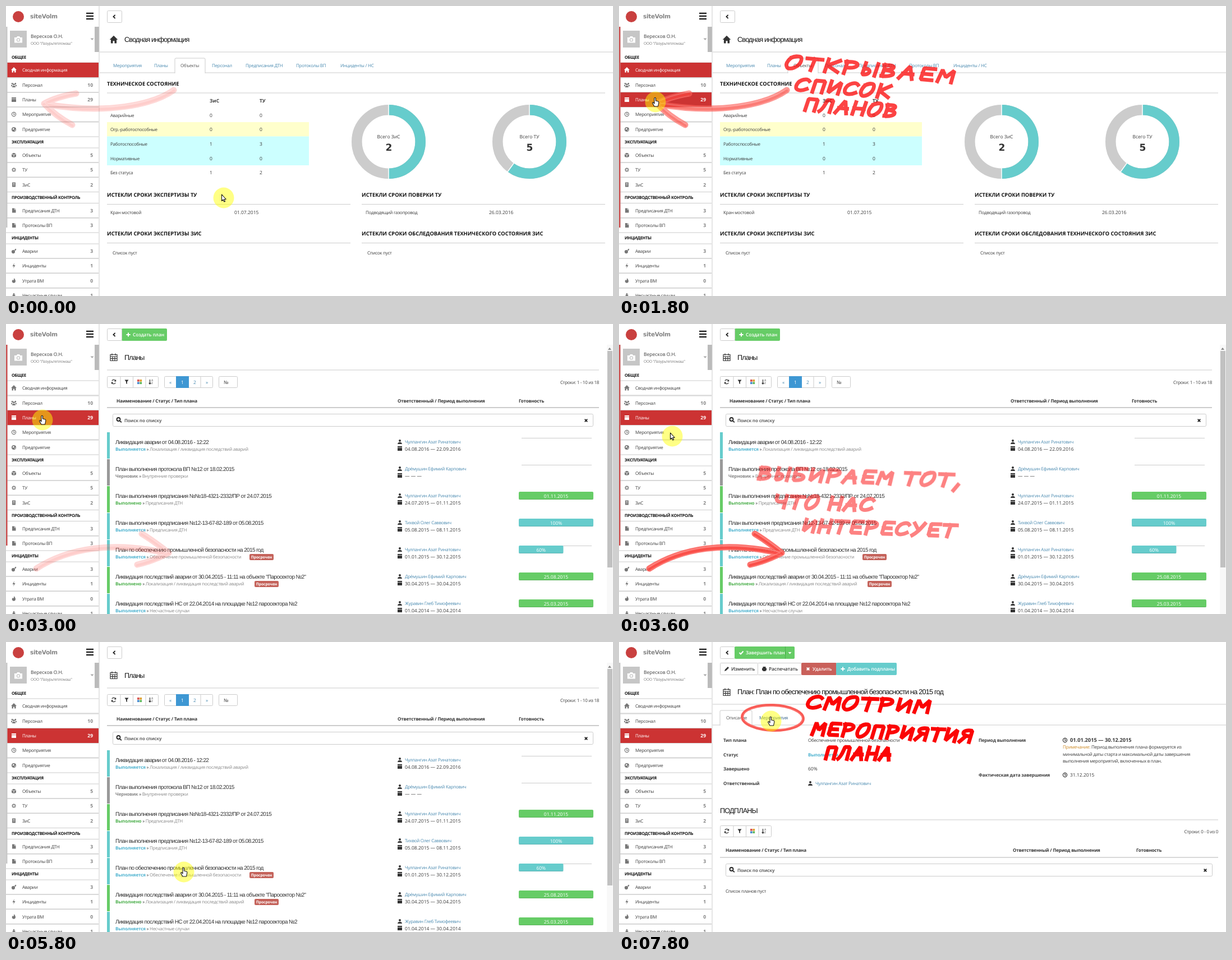
Recreate the animation shown at these times as an HTML page. Size 1082 by 517 pixels, loop 8 s.

```html
<!DOCTYPE html>
<html lang="ru">
<head>
<meta charset="utf-8">
<title>Планы</title>
<style>
html, body { margin: 0; width: 100%; height: 100%; overflow: hidden; background: #fff; }
svg { display: block; width: 100vw; height: 100vh; }
text { font: 8px "Open Sans", "Noto Sans", sans-serif; letter-spacing: -.035em; fill: #3c3c3c; text-rendering: geometricPrecision; white-space: pre; }
.b { font-weight: 700; letter-spacing: -.02em; }
.m { text-anchor: middle; }
.e { text-anchor: end; }
.h { font-size: 9.3px; font-weight: 700; letter-spacing: 0; fill: #111; }
.s { font-size: 7.4px; font-weight: 700; fill: #111; }
.d { font-size: 8.5px; letter-spacing: 0; }
.w { font-size: 8.4px; font-weight: 600; letter-spacing: -.01em; }
.t { font: 12.6px "Liberation Sans", Arial, sans-serif; letter-spacing: -.06em; fill: #111; }
.r { font: 10px "Liberation Sans", Arial, sans-serif; letter-spacing: -.063em; fill: #333; }
.ink { fill: none; stroke-linecap: round; stroke-linejoin: round; }
.pen { fill: none; stroke: #fb0505; stroke-width: 6.8; stroke-linecap: square; stroke-linejoin: bevel; }
</style>
</head>
<body>
<svg id="stage" viewBox="0 0 1082 517" preserveAspectRatio="none"></svg>
<script>
const RED = '#cc3333', TEAL = '#66cccc', GREEN = '#66cc66', LINK = '#4a8ab0', GREY = '#cccccc', DARK = '#333';

const text = (x, y, s, cls = '', fill = '') =>
  `<text x="${x}" y="${y}" class="${cls}"${fill && ` style="fill:${fill}"`}>${s}</text>`;
const span = (s, fill, cls = '') => `<tspan class="${cls}" style="fill:${fill}">${s}</tspan>`;
const rect = (x, y, w, h, fill, stroke = 'none', rx = 0) =>
  `<rect x="${x}" y="${y}" width="${w}" height="${h}" fill="${fill}" stroke="${stroke}" rx="${rx}"/>`;
const line = (x1, y, x2, w = 1, c = GREY) => rect(x1, y - w / 2, x2 - x1, w, c);
const vline = (x, y1, y2) => rect(x - .5, y1, 1, y2 - y1, GREY);
const group = (id, s) => `<g id="${id}">${s}</g>`;

const solid = {
  home: 'M-5 0L0-5 5 0H3.5V4.5H1V1.5H-1V4.5H-3.5V0Z',
  user: 'M0-4a2 2 0 110 4a2 2 0 110-4M-4 4C-4-.5 4-.5 4 4Z',
  users: 'M0-3a1.8 1.8 0 110 3.6a1.8 1.8 0 110-3.6M-3 4C-3 0 3 0 3 4ZM-4-4h2v3h-2zM2-4h2v3h-2zM-5 0h2.4v2h-2.4zM2.6 0h2.4v2h-2.4z',
  cal: 'M-4-4H4V-2H-4ZM-4-1.2H4V4H-4Z',
  globe: 'M0-4A4 4 0 110 4 4 4 0 110-4M-2-2L1-2.5 0 0-2 1ZM1 1L3 0 2 3Z',
  cube: 'M0-4.3L3.8-2.5 0-.8-3.8-2.5ZM-4-1.7L-.4 0V4.3L-4 2.5ZM4-1.7L.4 0V4.3L4 2.5Z',
  house: 'M-3-4H3V4H-3ZM-1.5-2.5V-1.5H1.5V-2.5ZM-1.5 0V1H1.5V0Z',
  file: 'M-3-4H.8V-1.2H3.5V4H-3ZM1.5-4L3.5-2H1.5Z',
  bomb: 'M-1-2a3.1 3.1 0 110 6.2a3.1 3.1 0 110-6.2M1-2L3-4.5 4.5-3 2.5-.5Z',
  bolt: 'M1-5L-2.5 1H0L-1 5 2.5-1H0Z',
  fire: 'M0-4.5C4-1 4 4 0 4.2-4.5 4-3.5-1-2-1.5L-1 0Q1-2 0-4.5Z',
  man: 'M0-4a1.5 1.5 0 110 3a1.5 1.5 0 110-3M-3-1H3L1.5 1V5H-1.5V1Z',
  filter: 'M-3.5-3.5H3.5L.9 0V4L-.9 3V0Z',
  camera: 'M-7-4H-3L-2-6H2L3-4H7V5.5H-7ZM0-2.8a3.2 3.2 0 100 6.4a3.2 3.2 0 100-6.4M0-1.4a1.9 1.9 0 110 3.8a1.9 1.9 0 110-3.8',
  down: 'M-3-1.5H3L0 2Z',
  pen: 'M-4 4L-3 1 2-4 4-2-1 3Z',
  printer: 'M-2.5-4H2.5V-1.5H4V2.5H2.5V4H-2.5V2.5H-4V-1.5H-2.5Z'
};
const stroked = {
  clock: 'M0-3.6A3.6 3.6 0 110 3.6 3.6 3.6 0 110-3.6M0-2.2V.3H1.8',
  gear: 'M0-2.2A2.2 2.2 0 110 2.2 2.2 2.2 0 110-2.2M0-4V-2.5M0 4V2.5M-4 0H-2.5M4 0H2.5M-2.8-2.8L-1.8-1.8M2.8 2.8L1.8 1.8M-2.8 2.8L-1.8 1.8M2.8-2.8L1.8-1.8',
  grid: 'M-6-4.5H6V6.5H-6ZM-6-1H6M-2-1V6.5M2-1V6.5M-6 2.7H6M-3-6.5V-3M3-6.5V-3',
  back: 'M1.6-3.2L-1.6 0 1.6 3.2',
  plus: 'M0-3.6V3.6M-3.6 0H3.6',
  cross: 'M-2.3-2.3L2.3 2.3M2.3-2.3L-2.3 2.3',
  tick: 'M-3.5 0L-1 2.5 3.5-2.5',
  lens: 'M-1-4A3 3 0 11-1 2 3 3 0 11-1-4M1.3 1.3L4.3 4.3',
  reload: 'M3.4-1.2A3.6 3.6 0 00-3.2-1.8M3.6-3.6V-1H1M-3.4 1.2A3.6 3.6 0 003.2 1.8M-3.6 3.6V1H-1',
  sort: 'M-2.5-4V4M-4.3 2L-2.5 4-.7 2'
};
const icon = (name, x, y, c = DARK, w = 1.2) => `<path transform="translate(${x} ${y})" ` + (solid[name]
  ? `d="${solid[name]}" fill="${c}" fill-rule="evenodd"/>`
  : `d="${stroked[name]}" fill="none" stroke="${c}" stroke-width="${w}"/>`);

// ---- sidebar ----
const menu = [
  ['Сводная информация', 'home', '', 114], ['Персонал', 'users', 10, 141], ['Планы', 'cal', 29, 167],
  ['Мероприятия', 'clock', '', 193], ['Предприятие', 'globe', '', 220],
  ['Объекты', 'cube', 5, 266], ['ТУ', 'gear', 5, 292], ['ЗиС', 'house', 2, 318.5],
  ['Предписания ДТН', 'file', 3, 364.5], ['Протоколы ВП', 'file', 3, 391],
  ['Аварии', 'bomb', 3, 437], ['Инциденты', 'bolt', 1, 463], ['Утрата ВМ', 'fire', 0, 489.5], ['Несчастные случаи', 'man', 1, 516]
];
const item = ([label, ic, n, y], c, ci, cn) => icon(ic, 14, y, ci) + text(29, y + 3, label, '', c) +
  text(155, y + 3, n, 'd b e', cn);
const lit = (id, i) => group(id, rect(0, menu[i][3] - 13, 165, 26, RED) + item(menu[i], '#fff', '#fff', '#fff'));

const sidebar = () => rect(0, 0, 166, 517, '#fff') +
  '<circle cx="22" cy="19" r="10" fill="#c9403f"/>' +
  '<text x="43" y="22" style="font:700 10.6px \'DejaVu Sans\',sans-serif;fill:#858585">siteVolm</text>' +
  [13, 18, 23].map(y => line(143, y, 156, 2.4, '#222')).join('') +
  rect(7, 44, 30, 30, '#c6c6c6') + icon('camera', 22, 60, '#fff') +
  text(44, 57, 'Вересков О.Н.', 'd') +
  '<text x="44" y="68.5" style="font-size:6.7px;fill:#777">ООО "Лазурьтепломаш"</text>' +
  icon('down', 153.5, 59, '#aaa') + rect(158, 37, 8, 45, '#bbb') +
  [['ОБЩЕЕ', 94], ['ЭКСПЛУАТАЦИЯ', 245], ['ПРОИЗВОДСТВЕННЫЙ КОНТРОЛЬ', 344], ['ИНЦИДЕНТЫ', 416]]
    .map(([s, y]) => text(10, y, s, 's')).join('') +
  menu.map(m => line(0, m[3] - 13, 165) + line(0, m[3] + 13, 165) + item(m, '#3c3c3c', '#777', '#808080')).join('') +
  lit('homeRow', 0) + lit('planRow', 2) + lit('eventRow', 3) + lit('firmRow', 4) +
  rect(0, 37, 2.5, 358, '#c8c8c8') + group('strip', rect(0, 37, 2.5, 358, '#cc5555')) + vline(166, 0, 517);

// ---- shared widgets ----
const backBtn = rect(180.5, 8.5, 26, 21, '#fff', GREY, 2) + icon('back', 193, 19, '#222', 1.8);
const button = (x, y, w, fill, ic, s, c = '#fff') => rect(x + .5, y + .5, w, 21, fill, c === '#fff' ? fill : GREY, 1) +
  icon(ic, x + 12, y + 11, c, 2) + text(x + 20, y + 14, s, 'w', c);
const search = (y, w) => rect(190.5, y + .5, w, 22, '#fff', GREY, 2) + icon('lens', 201.5, y + 11, '#222', 1.8) +
  text(211, y + 14.5, 'Поиск по списку', 'b', '#666') + icon('cross', 178 + w, y + 12, '#222', 1.8);
const tools = y => rect(180.5, y + .5, 91, 20, '#fff', GREY, 2) + [204, 226.5, 249].map(x => vline(x, y, y + 21)).join('') +
  icon('reload', 192, y + 10) + icon('filter', 215, y + 10) + icon('sort', 259, y + 10) +
  ['#d9534f', '#e0a030', '#4a8ad0', '#5cb85c'].map((c, i) => rect(234 + i % 2 * 4.4, y + 6 + (i >> 1) * 4.4, 3.7, 3.7, c)).join('') +
  `<text x="259" y="${y + 9}" style="font-size:5px">A</text><text x="259" y="${y + 14}" style="font-size:5px">Z</text>`;
const heads = (y, ...xs) => ['Наименование / Статус / Тип плана', 'Ответственный / Период выполнения', 'Готовность']
  .map((s, i) => text(xs[i], y, s, 'b', DARK)).join('');
const tab = (x, y, w) => line(167, y + 26, 1082) +
  `<path d="M${x} ${y + 27}V${y + 2}q0-2 2-2H${x + w - 2}q2 0 2 2V${y + 27}" fill="#fff" stroke="${GREY}"/>`;

// ---- dashboard ----
function donut(cx, share, label, n) {
  const a = share * 2 * Math.PI, cut = (p, r) => `${cx + r * Math.sin(p)} ${242 - r * Math.cos(p)}`;
  const r = 56.7, len = 2 * Math.PI * r;
  const ring = (c, d) => `<circle cx="${cx}" cy="242" r="${r}" fill="none" stroke="${c}" stroke-width="18.6" stroke-dasharray="${d * len} ${len}" transform="rotate(-90 ${cx} 242)"/>`;
  return ring(GREY, 1) + ring(TEAL, share) +
    `<path d="M${cut(0, 46)}L${cut(0, 67)}M${cut(a, 46)}L${cut(a, 67)}" stroke="#fff" stroke-width="1.5"/>` +
    text(cx, 235.5, label, 'm d') + `<text x="${cx}" y="258" class="m" style="font:700 17px 'DejaVu Sans',sans-serif;fill:#333">${n}</text>`;
}
function dashboard() {
  const tabs = [['Мероприятия', 191], ['Планы', 264], ['Объекты', 311], ['Персонал', 367], ['Предписания ДТН', 427], ['Протоколы ВП', 517], ['Инциденты / НС', 596]];
  const rows = [['Аварийные', 0, 0], ['Огр.-работоспособные', 0, 0], ['Работоспособные', 1, 3], ['Нормативные', 0, 0], ['Без статуса', 1, 2]];
  const block = (x, y, head) => text(x, y, head, 'h') + line(x, y + 13.5, x + 434);
  return backBtn + `<g transform="translate(192 60) scale(1.45)">${icon('home', 0, 0)}</g>` +
    text(211, 64, 'Сводная информация', 't') + line(167, 82, 1082) + tab(301, 93, 54) +
    tabs.map(([s, x]) => text(x, 109, s, '', x === 311 ? '#555' : LINK)).join('') +
    text(180, 142, 'ТЕХНИЧЕСКОЕ СОСТОЯНИЕ', 'h') + line(180, 155, 1068) +
    text(363, 171.5, 'ЗиС', 'd b') + text(452, 171.5, 'ТУ', 'd b') +
    rect(180, 207, 360, 25.5, '#ffffcc') + rect(180, 232.5, 360, 51.5, '#ccffff') +
    rows.map(([s, a, b], i) => [[186, s, ''], [363, a, 'd'], [452, b, 'd']]
      .map(([x, v, c]) => text(x, 197.5 + i * 25.7, v, c)).join('')).join('') +
    donut(682, .5, 'Всего ЗиС', 2) + donut(933, .6, 'Всего ТУ', 5) +
    block(180, 340, 'ИСТЕКЛИ СРОКИ ЭКСПЕРТИЗЫ ТУ') + block(634, 340, 'ИСТЕКЛИ СРОКИ ПОВЕРКИ ТУ') +
    text(186, 370.5, 'Кран мостовой') + text(407, 370.5, '01.07.2015', 'd') +
    text(641, 370.5, 'Подводящий газопровод') + text(861, 370.5, '26.03.2016', 'd') +
    block(180, 409, 'ИСТЕКЛИ СРОКИ ЭКСПЕРТИЗЫ ЗИС') + block(634, 409, 'ИСТЕКЛИ СРОКИ ОБСЛЕДОВАНИЯ ТЕХНИЧЕСКОГО СОСТОЯНИЯ ЗИС') +
    text(190, 443, 'Список пуст') + text(644, 443, 'Список пуст');
}

// ---- list of plans ----
const people = ['Чулпангин Азат Ринатович', 'Дрёмушин Ефимий Карпович', 'Тихвой Олег Саввович', 'Журавин Глеб Тимофеевич'];
const states = { run: ['Выполняется', TEAL, '#4fb3d0'], draft: ['Черновик', '#999', '#888'], done: ['Выполнено', GREEN, '#4eb04e'] };
const plans = [
  ['Ликвидация аварии от 04.08.2016 - 12:22', 'run', 'Локализация / ликвидация последствий аварий', 0, '04.08.2016 — 22.09.2016'],
  ['План выполнения протокола ВП №12 от 18.02.2015', 'draft', 'Внутренние проверки', 1, '— — —'],
  ['План выполнения предписания №№18-4321-2332/ПР от 24.07.2015', 'done', 'Предписания ДТН', 0, '24.07.2015 — 01.11.2015', '01.11.2015'],
  ['План выполнения предписания №12-13-67-82-189 от 05.08.2015', 'run', 'Предписания ДТН', 2, '05.08.2015 — 08.11.2015', '100%'],
  ['План по обеспечению промышленной безопасности на 2015 год', 'run', 'Обеспечение промышленной безопасности', 0, '01.01.2015 — 30.12.2015', '60%', 434],
  ['Ликвидация последствий аварии от 30.04.2015 - 11:11 на объекте "Паросектор №2"', 'done', 'Локализация / ликвидация последствий аварий', 1, '30.04.2015 — 30.04.2015', '25.08.2015', 443],
  ['Ликвидация последствий НС от 22.04.2014 на площадке №12 паросектора №2', 'run', 'Несчастные случаи', 3, '01.04.2014 — 30.04.2014', '25.03.2015']
];
function planRow([title, st, kind, who, dates, done, late], i) {
  const y = 193 + i * 48, [name, bar, ink] = states[st];
  const w = done === '60%' ? 79.5 : 133, fill = /%/.test(done) ? TEAL : GREEN;
  return rect(180, y, 5, 47, bar) + text(195, y + 20.5, title, 'r') +
    text(195, y + 33, span(name, ink, 'b') + span(' » ', '#444') + span(kind, '#888')) +
    icon('user', 702, y + 17) + text(711, y + 20, people[who], '', LINK) +
    icon('cal', 702, y + 29) + text(711, y + 32.5, dates, 'd') +
    (w < 133 || !done ? line(919, y + 10.5, 1044) : '') +
    (done ? rect(914, y + 10, w, 14, fill, 'none', 2) + rect(914, y + 23, w, 1, 'rgba(0,0,0,.12)') +
      text(914 + w / 2, y + 20.5, done, 'd m', '#fff') : '') +
    (late ? rect(late, y + 25, 43, 11, '#c4625a', 'none', 2) +
      `<text x="${late + 21.5}" y="${y + 33}" class="m b" style="font-size:6.8px;fill:#fff">Просрочен</text>` : '');
}
const list = () => group('create', button(206, 8, 80, GREEN, 'plus', 'Создать план')) + backBtn +
  icon('grid', 192, 59) + text(211, 64, 'Планы', 't') + line(180, 82, 1057) + tools(93) +
  rect(282.5, 93.5, 86, 20, '#fff', GREY, 2) + rect(303, 93, 23, 21, '#3e97d3') + vline(347, 93, 114) +
  [['«', 293, LINK], ['1', 314.5, '#fff'], ['2', 336.5, LINK], ['»', 358, LINK]].map(([s, x, c]) => text(x, 106.5, s, 'd m', c)).join('') +
  rect(379.5, 93.5, 33, 20, '#fff', GREY, 2) + text(388, 106.5, '№', 'd') +
  text(1057, 106.5, 'Строки: 1 - 10 из 18', 'e') +
  heads(140, 197, 698, 914) + line(180, 149, 1057, 2) + search(160, 856) + plans.map(planRow).join('') +
  rect(1071, 37, 11, 480, '#f8f8f8') + rect(1072, 48, 9, 386, '#c1c1c1') +
  '<path d="M1073 46L1076 42 1079 46Z" fill="#888"/>';

// ---- plan card ----
const card = () => backBtn + button(206, 8, 106, GREEN, 'tick', 'Завершить план') +
  rect(296, 8, 1, 22, '#4fae4f') + icon('down', 304.5, 19.5, '#fff') +
  button(180, 37, 67, '#fff', 'pen', 'Изменить', DARK) + button(247, 37, 78, '#fff', 'printer', 'Распечатать', DARK) +
  button(325, 37, 62, '#c9605a', 'cross', 'Удалить') + button(387, 37, 107, TEAL, 'plus', 'Добавить подпланы') +
  icon('grid', 192, 89) + text(211, 93, 'План: План по обеспечению промышленной безопасности на 2015 год', 't') +
  line(167, 111, 1082) + tab(180, 122, 57) + text(191, 138, 'Описание', '', '#555') +
  `<text id="eventTab" x="250" y="138" style="fill:${LINK}">Мероприятия</text>` +
  ['Тип плана', 'Статус', 'Завершено', 'Ответственный'].map((s, i) => text(186, 178 + i * 25.7, s, 'b')).join('') +
  text(337, 178, 'Обеспечение промышленной безопасности') + text(337, 203.5, 'Выполняется', 'b', '#4fb3d0') +
  text(337, 229, '60%', 'd') + icon('user', 341, 252) + text(350, 255, people[0], '', LINK) +
  text(641, 178, 'Период выполнения', 'b') + icon('clock', 795, 175) +
  '<text x="804" y="178" class="b" style="font-size:9.3px;letter-spacing:0">01.01.2015 — 30.12.2015</text>' +
  text(791, 190, span('Примечание:', '#cc8822') + ' Период выполнения плана формируется из') +
  text(791, 202.5, 'минимальной даты старта и максимальной даты завершения') +
  text(791, 214.5, 'выполнения мероприятий, включенных в план.') +
  text(641, 240, 'Фактическая дата завершения', 'b') + icon('clock', 795, 237) + text(804, 240, '31.12.2015', 'd') +
  text(180, 305, 'ПОДПЛАНЫ', 't') + line(180, 317, 1068) + tools(327) + text(1068, 341, 'Строки: 0 - 0 из 0', 'e') +
  heads(374, 190, 702, 922) + line(180, 384, 1068, 1.5) + search(395, 867) + text(190, 447, 'Список планов пуст');

// ---- handwriting and brush marks ----
const glyphs = {
  О: 'M10 1C2 3-2 18 3 25S20 22 20 10 14-1 5 4', С: 'M20 5C15-1 3 3 1 14S8 30 20 22', Т: 'M0 3H22M11 3L10 27',
  К: 'M3 1V27M20 2L4 14 21 26', Р: 'M3 2V27M1 3C24-2 24 16 4 15', Ы: 'M2 2V26C14 28 14 12 3 14M20 2V27',
  В: 'M3 2V26M1 3C20-1 20 11 4 13C24 13 22 27 2 26', А: 'M0 27L11 1 19 27M4 17H18', Е: 'M20 2H4V26H20M4 14H17',
  М: 'M1 27L3 2 11 17 20 2 21 27', П: 'M3 27V3H19V27', И: 'M2 2V26L19 3V27', Л: 'M0 27C6 22 6 10 8 2H18V27',
  Н: 'M2 2V27M19 2V27M2 15H19', Б: 'M19 2H3V26C24 28 22 12 3 14', Ч: 'M2 2C1 16 8 16 18 14M19 2V27',
  У: 'M2 2L11 15M20 2C14 14 10 22 3 27', Я: 'M19 27V3C-2 0-1 15 18 15M10 15L1 27', ',': 'M6 24L1 36'
};
function script(s, x, y, step, tilt) {
  let pos = 0;
  const letters = [...s].map(ch => {
    const at = pos;
    pos += ch === ' ' ? step / 2 : step;
    return glyphs[ch] ? `<path d="${glyphs[ch]}" vector-effect="non-scaling-stroke" transform="translate(${at} 0) scale(${step * .036} .85)"/>` : '';
  });
  return `<g class="pen" role="img" aria-label="${s}" transform="translate(${x} ${y}) rotate(${tilt}) skewX(-14)">${letters.join('')}</g>`;
}
const brush = d => [['#fc605a', 11, 0, .88], ['#f9403a', 5, 1.4, .7], ['#ff938d', 1, -2.6, .9], ['#ff857f', .9, 4, .9]]
  .map(([c, w, dy, o]) => `<path class="ink" d="${d}" stroke="${c}" stroke-width="${w}" opacity="${o}" transform="translate(0 ${dy})"/>`).join('');

const marks =
  group('arrow1', brush('M299 150C262 176 180 194 70 175M125 156Q90 162 68 174Q88 196 118 212')) +
  group('note1', script('ОТКРЫВАЕМ', 303, 88, 34, 5) + script('СПИСОК', 320, 128, 29, 4.5) + script('ПЛАНОВ', 336, 163, 28.5, 4.5)) +
  group('arrow2', brush('M54 436C110 400 190 386 288 409M242 374Q262 386 290 408Q264 422 234 429')) +
  group('note2', script('ВЫБИРАЕМ ТОТ,', 253, 254, 30.5, 2) + script('ЧТО НАС', 281, 304, 28, 2) + script('ИНТЕРЕСУЕТ', 333, 347, 27.6, 2)) +
  group('ring', '<g class="ink" transform="rotate(2 274 135)"><ellipse cx="274" cy="135" rx="54.5" ry="22.5" stroke="#fc6d68" stroke-width="5"/>' +
    '<ellipse cx="274" cy="135" rx="55" ry="23" stroke="#f5504a" stroke-width="1.5"/></g>') +
  group('note3', script('СМОТРИМ', 340, 95, 32, 2) + script('МЕРОПРИЯТИЯ', 350, 142, 26.3, 2.8) + script('ПЛАНА', 372, 185, 24.5, 1));

const pointer = '<circle r="18.5" fill="#ff0" opacity=".48"/><g fill="#fff" stroke="#111" stroke-width="1.1" stroke-linejoin="round">' +
  '<path id="arrow" d="M-3.5-6V5.5L-1 3.2 .8 7 2.6 6.2 .9 2.5H4.2Z"/>' +
  '<path id="hand" d="M-2-6.5C-2-8.2 .5-8.2 .5-6.5V-2L4.8-1Q6.2-.5 5.8 2L4.5 8H-2L-5.2 2.5C-6 1-4 .2-3 1.8L-2 3Z"/></g>';

document.getElementById('stage').innerHTML = group('dash', dashboard()) + group('list', list()) + group('card', card()) +
  sidebar() + marks + group('cursor', pointer);

// ---- timeline ----
const LOOP = 8000, STEP = 200;
const fades = {
  arrow1: [[0, .28], [600, 1], [1600, 1], [2400, 0]],
  note1: [[200, 0], [1000, 1], [1600, 1], [2400, 0]],
  arrow2: [[2600, 0], [2800, .06], [3000, .28], [3600, 1], [5000, 1], [5800, 0]],
  note2: [[3200, 0], [4000, 1], [5000, 1], [5800, 0]],
  ring: [[6600, 0], [7400, 1]],
  note3: [[6800, 0], [7600, 1]],
  strip: [[1000, 0], [1600, 1], [4000, 1], [4800, 0]],
  planRow: [[1000, 0], [1400, 1]],
  eventRow: [[1000, 0], [1200, .4], [1400, .1], [1600, 0]],
  firmRow: [[600, 0], [800, .6], [1000, .25], [1200, 0]]
};
const path = [[200, 388, 342], [400, 355, 323], [600, 270, 277], [800, 178, 227], [1000, 116, 194], [1200, 72, 174], [1400, 65, 171],
  [3400, 65, 171], [3600, 95, 200], [4200, 300, 394], [4400, 317, 410], [6800, 317, 410], [7000, 314, 390], [7600, 285, 203], [7800, 271, 141]];
const shown = {
  dash: [[0, 2800]], list: [[2800, 6600]], card: [[6600, LOOP]], homeRow: [[0, 2800]], create: [[2800, 5400]],
  hand: [[800, 3600], [4200, 7000], [7800, LOOP]], arrow: [[0, 800], [3600, 4200], [7000, 7800]]
};
const el = id => document.getElementById(id);

function at(keys, t, k = 1) {
  const i = keys.findIndex(p => p[0] > t);
  if (i === 0) return keys[0][k];
  if (i < 0) return keys[keys.length - 1][k];
  const a = keys[i - 1], b = keys[i];
  return a[k] + (b[k] - a[k]) * (t - a[0]) / (b[0] - a[0]);
}
function draw(now) {
  const t = Math.floor(now % LOOP / STEP) * STEP;
  for (const id in fades) el(id).setAttribute('opacity', at(fades[id], t));
  for (const id in shown) el(id).style.display = shown[id].some(([a, b]) => t >= a && t < b) ? '' : 'none';
  el('cursor').setAttribute('transform', `translate(${at(path, t)} ${at(path, t, 2)})`);
  el('eventTab').style.fill = t >= 7800 ? '#2a5a86' : LINK;
}
const start = performance.now();
function tick() {
  draw(performance.now() - start);
  requestAnimationFrame(tick);
}
tick();
</script>
</body>
</html>
```
